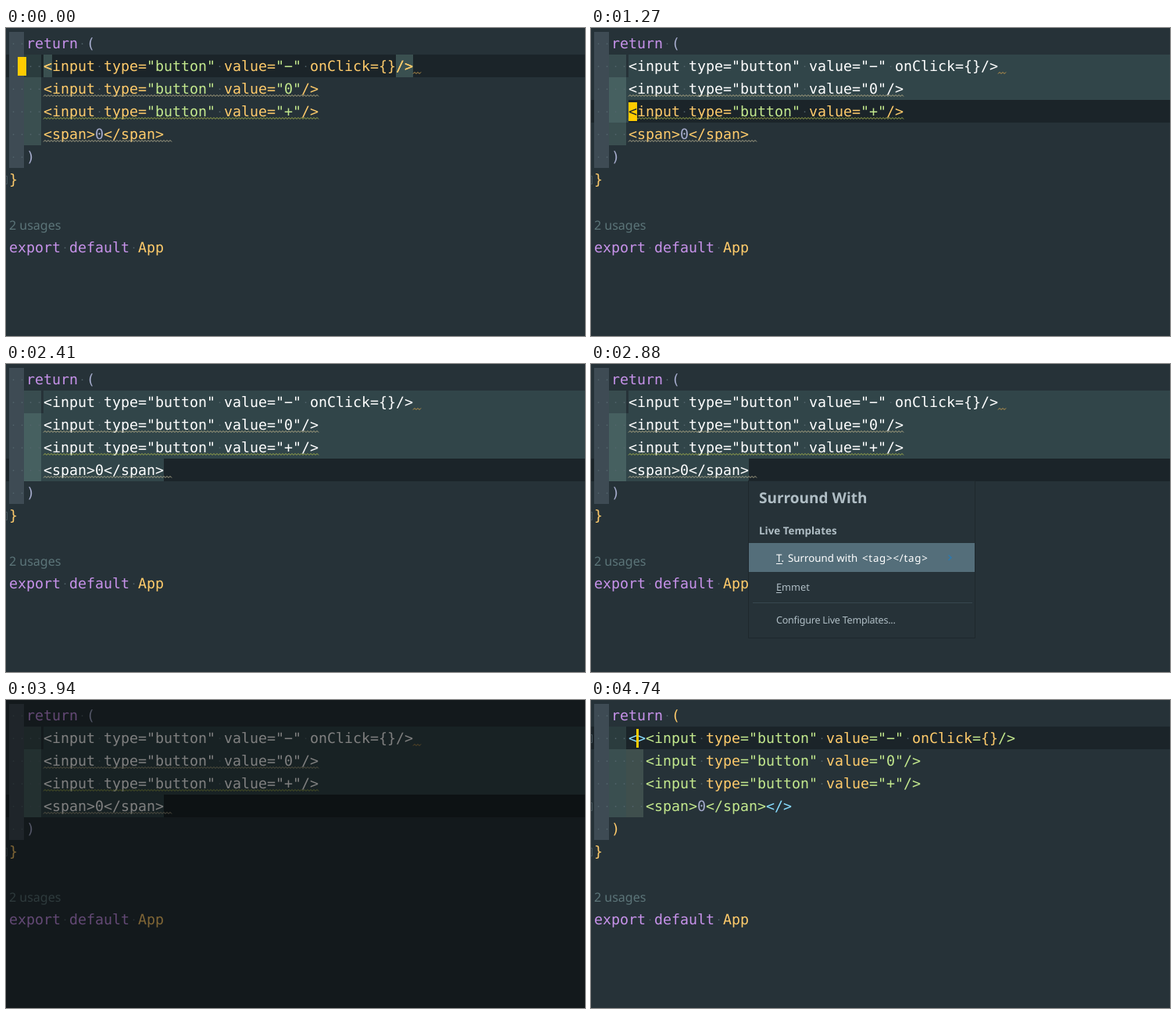
Write an HTML page that moves like this. It is 741 px wide and 394 px high and loops after 5.6 s.

```html
<!DOCTYPE html>
<html lang="en">
<head>
<meta charset="utf-8">
<style>
  html, body { margin: 0; width: 100%; height: 100%; overflow: hidden; background: #263238; }
  svg { display: block; width: 741px; height: 394px; }
  text { white-space: pre; text-rendering: geometricPrecision; }
  .code { font: 18.27px "DejaVu Sans Mono", monospace; }
  .ui { font-family: "Noto Sans", "Open Sans", sans-serif; }
</style>
</head>
<body>
<svg id="stage" viewBox="0 0 741 394" xmlns="http://www.w3.org/2000/svg"></svg>
<script>
const LOOP = 5600, CW = 11, ROW = 29, LEFT = 4, W = 741;
const C = {
  bg: '#263238', line: '#1b2429', caret: '#ffcc00', yellow: '#ffcb6b', green: '#c3e88d',
  purple: '#c792ea', plain: '#a6accd', blue: '#89ddff', select: '#314549', match: '#3a5050',
  dot: '#53656c', hint: '#5c7579', fold: '#46545b'
};

const CODE = [
  '<input type="button" value="\u2212" onClick={}/>',
  '<input type="button" value="0"/>',
  '<input type="button" value="+"/>',
  '<span>0</span>'
];
const TOKEN = /"[^"]*"|\w+(?==)|[{}]| |(?<=>)0|[^ "{}>]+(?= )|=|\/>|<[^>]*>/g;

// Each step changes part of the editor state from the given time on.
const STEPS = [
  [0, { row: 1, col: 1, match: true }],
  [130, { col: 2 }],
  [260, { col: 3 }],
  [390, { col: 4, word: true }],
  [870, { match: false }],
  [1140, { row: 2, word: false, select: true }],
  [1270, { row: 3 }],
  [1540, { row: 4 }],
  [1810, { col: 18 }],
  [2340, { hideCaret: true }],
  [2880, { popup: true }],
  [2950, { dim: true }],
  [3940, { popup: false }],
  [4010, { dim: false }],
  [4080, { row: 1, col: 5, select: false, hideCaret: false, wrapped: true }],
  [4610, { parsed: true }],
  [4740, { clean: true }]
];

const esc = s => s.replace(/&/g, '&amp;').replace(/</g, '&lt;').replace(/>/g, '&gt;');
const colX = col => LEFT + col * CW;
const rowY = row => 5 + row * ROW;
const rect = (x, y, w, h, fill, extra = '') =>
  `<rect x="${x}" y="${y}" width="${w}" height="${h}" fill="${fill}" ${extra}/>`;
const band = (x0, x1, row, fill, rows = 1) => rect(x0, rowY(row), x1 - x0, ROW * rows, fill);

function code(str, col, row, fill, style = '') {
  return `<text class="code" x="${colX(col)}" y="${rowY(row) + 21}" fill="${fill}" ${style}>${esc(str)}</text>`;
}
const ITALIC = 'font-style="italic"', BOLD = 'font-weight="bold"';

function dot(col, row) {
  return rect(colX(col) + 4.8, rowY(row) + 14.5, 1.5, 1.5, C.dot);
}

function ui(str, x, y, size, fill, extra = '') {
  return `<text class="ui" x="${x}" y="${y}" font-size="${size}" fill="${fill}" ${extra}>${esc(str)}</text>`;
}

function wave(x0, x1, row, color) {
  let d = `M${x0} ${rowY(row) + 24.5}`;
  for (let x = x0 + 2, up = true; x <= x1; x += 2, up = !up) d += `L${x} ${rowY(row) + (up ? 22.5 : 24.5)}`;
  return `<path d="${d}" fill="none" stroke="${color}" stroke-width="1"/>`;
}

function fold(row) {
  const y = rowY(row) + 10.5;
  return `<path d="M0 ${y}H1.5V${y + 10}H0" fill="none" stroke="${C.fold}"/>`;
}

function codeLine(str, col, row, tagColor, selected) {
  let out = '';
  for (const m of str.matchAll(TOKEN)) {
    const t = m[0], at = col + m.index;
    if (t === ' ') { out += dot(at, row); continue; }
    const attr = /^\w+$/.test(t) && t !== '0';
    let fill = tagColor;
    if (t[0] === '"') fill = C.green;
    else if (attr || /[{}]/.test(t)) fill = C.yellow;
    else if (t === '0') fill = C.plain;
    out += code(t, at, row, selected ? '#ffffff' : fill, attr ? ITALIC : '');
  }
  return out;
}

function backdrop(s) {
  let out = rect(0, 0, W, 394, C.bg) + band(0, W, s.row, C.line);
  out += band(LEFT, 23, 0, '#3e4b54', 6);
  if (s.select) {
    out += band(48, W, 1, C.select);
    for (let r = 2; r < s.row; r++) out += band(45, W, r, C.select);
    out += band(45, colX(s.col), s.row, C.select);
  }
  for (let r = 1; r <= 4; r++) {
    let fill = r === s.row ? '#2b3c3e' : '#3a4f50';
    if (s.select) fill = r === 1 ? '#384c4f' : r <= s.row ? '#466060' : '#3a4f50';
    out += band(23, 45, r, fill);
    if (s.wrapped && r > 1) out += band(45, 67, r, '#3f4f4d');
  }
  return out;
}

function editor(s) {
  const shift = s.wrapped ? 2 : 0, first = 4 + shift;
  const paren = s.parsed ? C.yellow : C.plain;
  let out = backdrop(s);

  if (s.match) out += band(48, 59, 1, C.match) + band(499, 521, 1, C.match);
  if (s.word) out += band(59, 114, 1, '#38504f');

  for (let r = 0; r <= 5; r++) {
    const n = r % 5 === 0 ? 2 : r === 1 ? 4 : first;
    for (let c = 0; c < n; c++) out += dot(c, r);
  }
  out += code('return', 2, 0, C.purple, ITALIC) + dot(8, 0) + code('(', 9, 0, s.wrapped ? C.yellow : C.plain);

  CODE.forEach((str, i) => {
    const r = i + 1;
    const whole = s.select && (r < s.row || s.col > 4);
    out += codeLine(str, first, r, s.parsed ? C.green : C.yellow, whole);
  });
  if (s.match) out += code('<', 4, 1, C.yellow, BOLD) + code('/>', 45, 1, C.yellow, BOLD);
  if (s.wrapped) {
    const fill = s.parsed ? C.blue : C.yellow;
    out += code('<>', 4, 1, fill) + code('</>', 20, 4, fill) + fold(1) + fold(4);
  }
  if (!s.clean) {
    const dx = shift * CW;
    out += wave(521 + dx, 531 + dx, 1, '#c79a4b') + wave(48 + dx, 400 + dx, 2, '#b5ac86') +
      wave(48 + dx, 400 + dx, 3, '#a3b04a') + wave(48 + dx, 212 + dx, 4, '#b0aa8c');
  }

  out += code(')', 2, 5, paren) + code('}', 0, 6, C.yellow) + fold(6);
  out += ui('2 usages', 4, 258, 16, C.hint);
  out += code('export', 0, 9, C.purple, ITALIC) + dot(6, 9) + code('default', 7, 9, C.purple, ITALIC) +
    dot(14, 9) + code('App', 15, 9, C.yellow, ITALIC);
  return out + caret(s);
}

function caret(s) {
  if (s.hideCaret) return '';
  const x = colX(s.col), y = rowY(s.row) + 3;
  if (s.wrapped) return rect(x - 1, y, 3, 24, C.caret);
  return rect(x, y, CW, 24, C.caret) + (s.col === 4 ? code('<', 4, s.row, '#1b2429') : '');
}

function popup() {
  const soft = '#b0bec5', white = '#ffffff';
  return rect(201.5, 149.5, 290, 201, C.bg, 'stroke="#1e282d"') +
    ui('Surround With', 215, 178, 19, soft, BOLD) +
    ui('Live Templates', 215, 218, 13.4, soft, BOLD) +
    rect(202, 229, 289, 37, '#546e7a') +
    ui('T.', 237, 253, 13.3, white) + rect(237, 255, 8, 1, white) +
    ui('Surround with', 252, 253, 13.3, white) +
    ui('<tag></tag>', 347, 253, 13.3, white, 'letter-spacing=".75"') +
    '<path d="M457.5 244.5L461 247.7L457.5 251" fill="none" stroke="#2f79ad" stroke-width="1.6"/>' +
    ui('Emmet', 237, 290, 12.8, soft) + rect(237, 292, 7, 1, soft) +
    rect(207, 305, 281, 1, '#37474f') +
    ui('Configure Live Templates...', 237, 332, 12.6, soft, 'letter-spacing="-.25"');
}

const stage = document.getElementById('stage');
let shown = -1;

function render(ms) {
  const t = ms % LOOP;
  const count = STEPS.filter(([at]) => at <= t).length;
  if (count === shown) return;
  shown = count;
  const s = Object.assign({}, ...STEPS.slice(0, count).map(step => step[1]));
  stage.innerHTML = editor(s) +
    (s.dim ? rect(0, 0, W, 394, '#000', 'opacity=".5"') : '') +
    (s.popup ? popup() : '');
}

const start = performance.now();
function tick() {
  render(performance.now() - start);
  requestAnimationFrame(tick);
}
tick();
</script>
</body>
</html>
```
